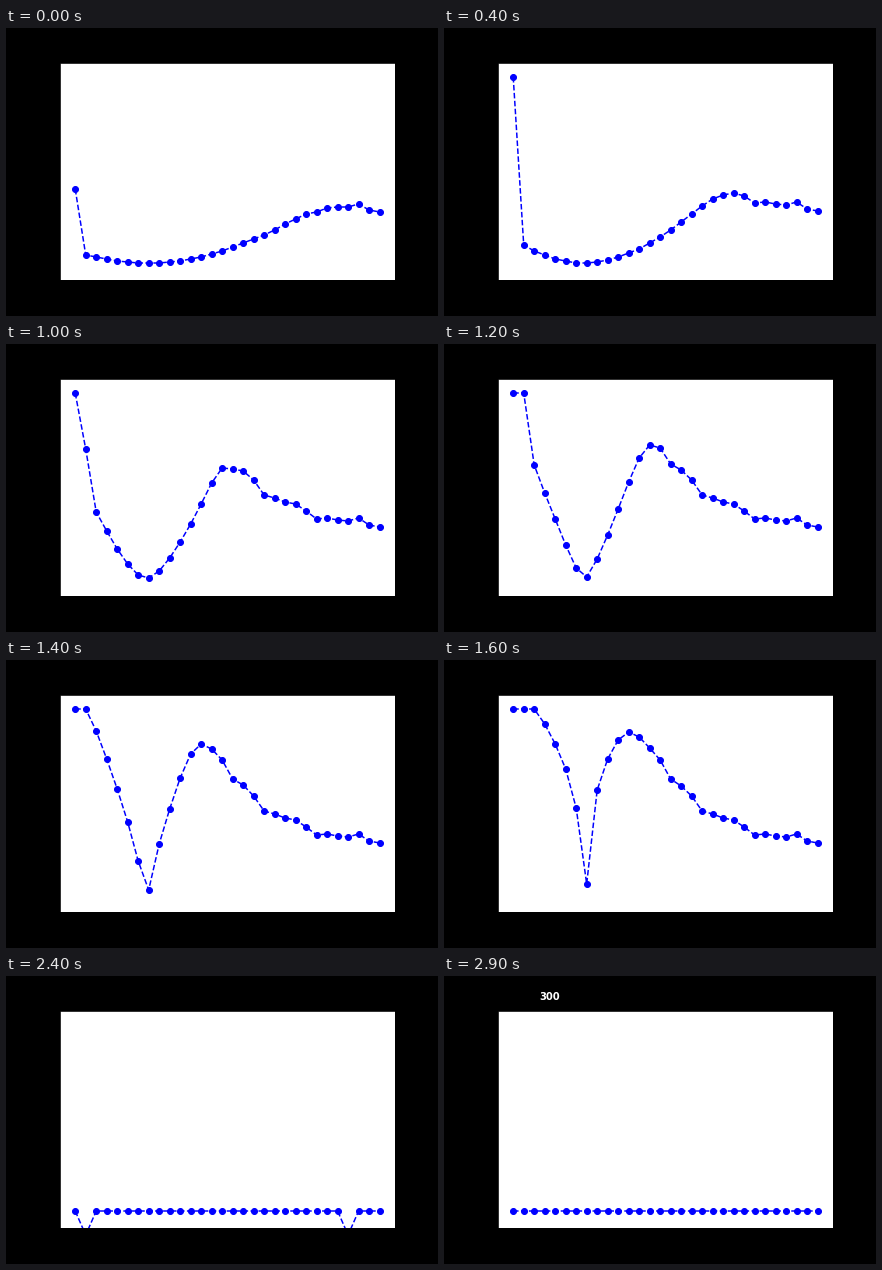
Write a matplotlib script that moves like this. It is 432x288 px and loops after 3 s.

```python
import numpy as np
import matplotlib.pyplot as plt
from matplotlib.animation import FuncAnimation

W, H, DPI = 432, 288, 72
FRAMES, INTERVAL = 30, 100
TOP, BOTTOM = 35.4, 252      # plot area, in pixels from the stage top
HIGH, LOW = 49, 235          # pixel heights of the values 1 and 0
COLLAPSE = 24                # step at which the curve falls flat
CENTRE = 7                   # point where the notch lies

x = np.arange(30)
dist = np.maximum(x - CENTRE, CENTRE - 0.4 - x)
rng = np.random.default_rng(4)
noise = np.where(x > CENTRE + 5, rng.uniform(-0.025, 0.025, x.size), 0)
tail = 0.27 + 0.66 * np.exp((12 - x) / 5) + noise


def growth(t):
    """Level next to the notch: a slow start, then a steep logistic rise."""
    return 1 / (1 + np.exp(6.37 - 0.7 * t - 0.24 * t * abs(t)))


def soft_min(a, b, n=5):
    return a * b / (a**n + b**n) ** (1 / n)


def values(step):
    if step >= COLLAPSE:
        v = np.zeros(x.size)
        if step < FRAMES - 1:
            # Two dips run inwards until the line is flat
            shift = 3 * (step - COLLAPSE)
            v[[1 + shift, 26 - shift]] = -0.13
        return v
    t = step / 4
    level = growth(t)
    # The valley opens as a parabola and squares up into a plateau
    valley = level * dist ** (2.1 * (1 - level**0.35))
    edge = 0.4 + 0.18 * step - 1.5 * x
    v = np.maximum(soft_min(valley, tail), edge)
    v[CENTRE] = growth(t - 1.3)
    return np.clip(v, 0, 1)


def heights(step):
    return np.round(LOW - (LOW - HIGH) * values(step))


fig = plt.figure(figsize=(W / DPI, H / DPI), dpi=DPI, facecolor="black")
ax = fig.add_axes([0.125, 1 - BOTTOM / H, 0.775, (BOTTOM - TOP) / H])
ax.set_facecolor("white")
ax.set_xticks([])
ax.set_yticks([])
margin = 0.05 * (x.size - 1)
ax.set_xlim(-margin, x.size - 1 + margin)
ax.set_ylim(BOTTOM, TOP)

line, = ax.plot(x, heights(0), "b--", marker="o", markersize=6, linewidth=1.5)
label = fig.text(95 / W, 1 - 24 / H, "", color="white", fontsize=10,
                 weight="bold", family="DejaVu Sans")


def update(step):
    line.set_ydata(heights(step))
    label.set_text("300" if step == FRAMES - 1 else "")
    return line, label


anim = FuncAnimation(fig, update, frames=FRAMES, interval=INTERVAL, repeat=True)
plt.show()
```
